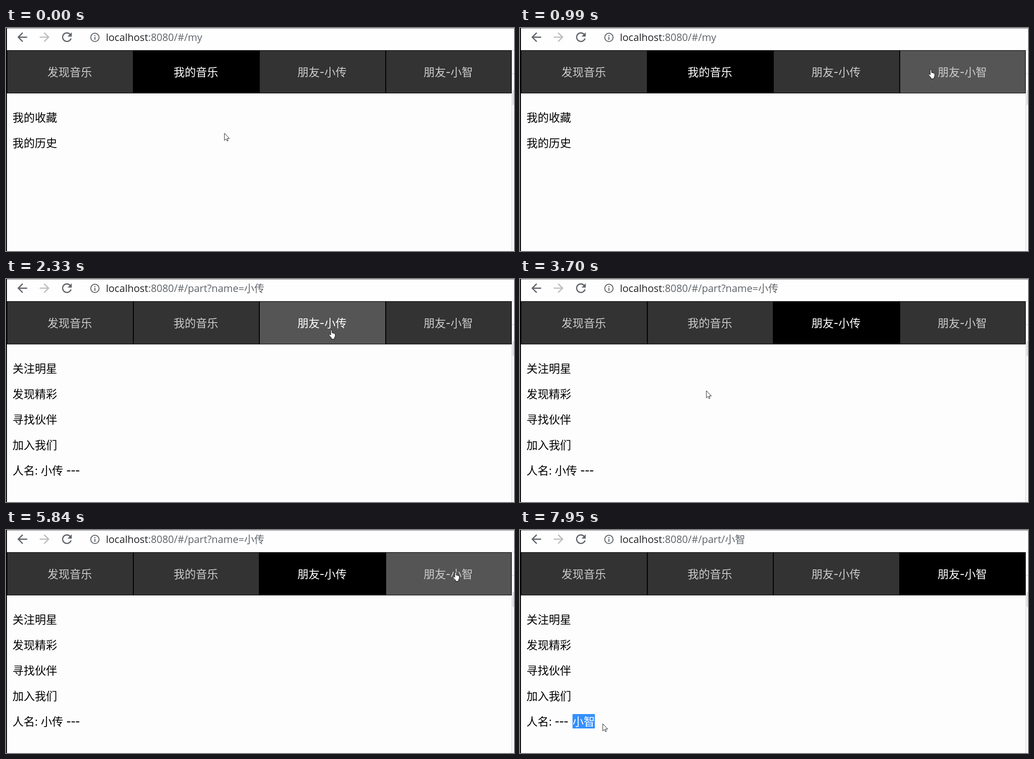
Recreate the animation shown at these times as an HTML page. Size 1093 by 481 pixels, loop 8 s.

```html
<!DOCTYPE html>
<html lang="zh-CN">
<head>
<meta charset="utf-8">
<style>
  html, body { margin: 0; width: 100%; height: 100%; overflow: hidden; background: #fdfdfd; }
  svg { display: block; }
  text { font: 24px "Open Sans", "Noto Sans CJK SC", "Noto Sans CJK", sans-serif; white-space: pre; }
  .url { font-size: 21.7px; }
  .dash { font-size: 30px; }
</style>
</head>
<body>
<svg width="1093" height="481" viewBox="0 0 1093 481">
  <defs>
    <path id="back" d="M20 11H7.83l5.59-5.59L12 4l-8 8 8 8 1.41-1.41L7.83 13H20z"/>
    <path id="arrow" d="M1 1V16.5L4.5 13.2 6.8 18 9 17 6.8 12.3H11.7Z" fill="#fff" stroke="#000" stroke-width=".9"/>
    <path id="hand" d="M4.7 12V2.2Q4.7.7 6 .7T7.4 2.2V7L12 8.2Q14.3 8.8 14.3 10.8V14.5L12.7 17.5V20.5H6.2V18L1.2 12.6Q.2 10.6 2.4 10.3Z" fill="#fff" stroke="#000" stroke-width=".9"/>
    <path id="beam" d="M1 .5H8M4.5 1V15.5M1 16H8" fill="none" stroke="#000"/>
  </defs>
  <rect width="1093" height="47" fill="#fefefe"/>
  <rect y="47" width="1093" height="1" fill="#ddd"/>
  <rect width="1093" height="1" fill="#777"/>
  <g fill="#5f6368">
    <use href="#back" transform="translate(19.3 4.1) scale(1.31)"/>
    <use href="#back" transform="translate(98.7 35.5) scale(-1.31)" fill="#bdbdbd"/>
    <path transform="translate(115.3 4.1) scale(1.31)" d="M17.65 6.35C16.2 4.9 14.21 4 12 4c-4.42 0-7.99 3.58-7.99 8s3.57 8 7.99 8c3.73 0 6.84-2.55 7.73-6h-2.08c-.82 2.33-3.04 4-5.65 4-3.31 0-6-2.69-6-6s2.69-6 6-6c1.66 0 3.14.69 4.22 1.78L13 11h7V4z"/>
    <circle cx="191.3" cy="20.3" r="9" fill="none" stroke="#5f6368" stroke-width="2"/>
    <path d="M190.2 15.2h2.2v2.3h-2.2zM190.2 19.2h2.2v6.3h-2.2z"/>
  </g>
  <rect width="2" height="481" fill="#000"/>
  <path d="M1088.5 48V481M1089 98.5h4" stroke="#ccc"/>
  <rect x="1090" y="134" width="3" height="32" fill="#ddd"/>
  <rect x="2" y="48" width="1086" height="93" fill="#000"/>
  <g id="scene"></g>
</svg>
<script>
const LOOP = 8000, TICK = 135, TAB_W = 271.5, CHAR = 24, ROW = 55;
const FIRST_CLICK = 2330, SECOND_CLICK = 6230;
const scene = document.getElementById('scene');
const tabs = ['发现音乐', '我的音乐', '朋友-小传', '朋友-小智'];
const myRows = ['我的收藏', '我的历史'];
const partRows = ['关注明星', '发现精彩', '寻找伙伴', '加入我们'];

// Where the pointer turns or rests: [time, x, y]
const turns = [
  [0, 470, 227], [310, 590, 174], [610, 694, 110], [990, 884, 90], [1140, 936, 90],
  [1400, 936, 90], [1780, 705, 110], [1930, 700, 110], [3560, 700, 110],
  [3700, 401, 241], [3820, 217, 341], [4220, 66, 437], [4360, 73, 422], [4760, 136, 422],
  [5140, 436, 428], [5290, 704, 266], [5680, 954, 98], [5840, 967, 91], [6520, 967, 91],
  [6660, 721, 268], [6900, 223, 461], [7290, 115, 428], [7440, 114, 420], [7950, 178, 418],
  [LOOP, 178, 418]
];

function pointer(t) {
  const i = turns.findLastIndex(p => p[0] <= t);
  const [t0, x0, y0] = turns[i], [t1, x1, y1] = turns[i + 1];
  const jumps = Math.max(1, Math.round((t1 - t0) / TICK));
  const k = Math.floor((t - t0) / (t1 - t0) * jumps) / jumps;
  return { x: x0 + (x1 - x0) * k, y: y0 + (y1 - y0) * k };
}

const text = (x, y, str, fill = '#000', kind = '') =>
  `<text x="${x}" y="${y}" fill="${fill}" class="${kind}">${str}</text>`;

function address(active) {
  const route = ['', 'my', 'part?name=小传', 'part/小智'][active];
  return text(215, 28, `<tspan fill="#202124">localhost</tspan>:8080/#/${route}`, '#5f6368', 'url');
}

function tab(i, active, hover) {
  const left = Math.round(3 + TAB_W * i), right = Math.round(1 + TAB_W * (i + 1));
  const mid = 1.2 + TAB_W * (i + .5);
  const bg = i === hover ? '#555' : i === active ? '#000' : '#333';
  const fg = i === active ? '#fff' : '#ccc';
  const [head, tail] = tabs[i].split('-');
  const label = tail
    ? text(mid - 53, 104, head, fg) + text(mid - 5, 104, '-', fg, 'dash') + text(mid + 5, 104, tail, fg)
    : text(mid - 48, 104, head, fg);
  return `<rect x="${left}" y="49" width="${right - left}" height="91" fill="${bg}"/>` + label;
}

function nameRow(active, t, x) {
  const y = 202 + 4 * ROW;
  const [name, nameX, dashX] = active === 2 ? ['小传', 75, 130] : ['小智', 113, 75];
  const dragging = t >= 4360 && t < 4880 || t >= 7440;
  const picked = dragging ? Math.max(0, Math.min(2, Math.round((x - nameX) / CHAR))) : 0;
  return text(14, y, '人名:') + text(dashX, y, '---', '#000', 'dash') +
    `<rect x="${nameX}" y="397" width="${picked * CHAR}" height="31" fill="#3390ff"/>` +
    [...name].map((c, i) => text(nameX + i * CHAR, y, c, i < picked ? '#fff' : '#000')).join('');
}

function cursor(x, y, overTabs) {
  const overName = x < 161 && y > 397 && y < 427;
  const [shape, dx, dy] = overTabs ? ['hand', 6, 1] : overName ? ['beam', 4.5, 8] : ['arrow', 1, 1];
  return `<use href="#${shape}" x="${x - dx}" y="${y - dy}"/>`;
}

function picture(t) {
  const { x, y } = pointer(t);
  const active = t < FIRST_CLICK ? 1 : t < SECOND_CLICK ? 2 : 3;
  const overTabs = y < 141;
  const hover = overTabs ? Math.floor((x - 2) / TAB_W) : -1;
  return address(active) +
    tabs.map((_, i) => tab(i, active, hover)).join('') +
    (active === 1 ? myRows : partRows).map((r, i) => text(14, 202 + i * ROW, r)).join('') +
    (active > 1 ? nameRow(active, t, x) : '') +
    cursor(x, y, overTabs);
}

let shown = '';
function frame() {
  const next = picture(performance.now() % LOOP);
  if (next !== shown) scene.innerHTML = shown = next;
  requestAnimationFrame(frame);
}
frame();
</script>
</body>
</html>
```
